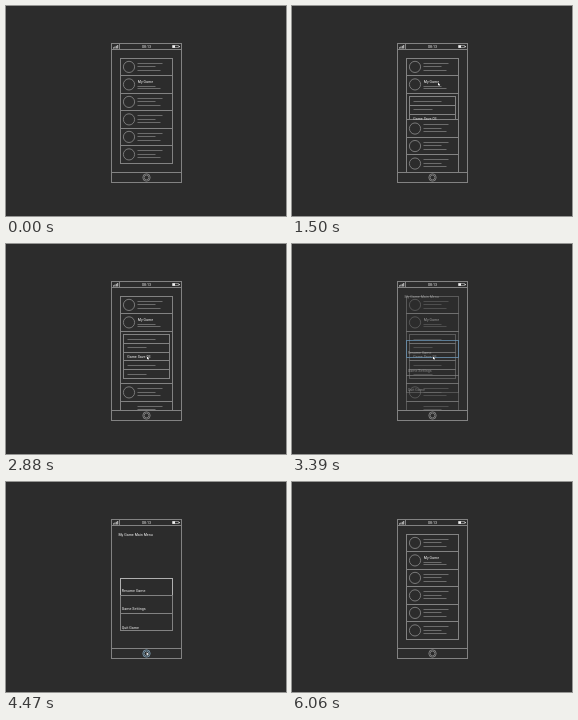
Write an HTML page with a canvas that moves like this. It is 280x210 px and loops after 6090 ms.

```html
<!DOCTYPE html>
<html lang="en">
<head>
<meta charset="utf-8">
<title>Phone menu wireframe</title>
<style>
  html, body { margin: 0; width: 100%; height: 100%; overflow: hidden; background: #2c2c2c; }
  canvas { display: block; width: 280px; height: 210px; }
</style>
</head>
<body>
<canvas></canvas>
<script>
const LOOP = 6090, W = 280, H = 210;
const BG = '#2c2c2c', LINE = '#828282', DIM = '#6c6c6c', WHITE = '#f2f2f2', BLUE = '#4a90c4';
const canvas = document.querySelector('canvas');
const ctx = canvas.getContext('2d');
const scale = window.devicePixelRatio || 1;
canvas.width = W * scale;
canvas.height = H * scale;

const clamp = v => Math.max(0, Math.min(1, v));
const progress = (t, from, to) => clamp((t - from) / (to - from));
const mix = (a, b, p) => a + (b - a) * p;
const smooth = p => p * p * (3 - 2 * p);
const snap = v => Math.floor(v) + .5;

// Cubic bezier (.25, .1, .25, 1): fast start, long settling.
function ease(p) {
  const bezier = (u, a, b) => 3 * u * (1 - u) ** 2 * a + 3 * u * u * (1 - u) * b + u ** 3;
  let low = 0, high = 1;
  for (let i = 0; i < 20; i++) {
    const mid = (low + high) / 2;
    if (bezier(mid, .25, .25) < p) low = mid; else high = mid;
  }
  return bezier(low, .1, 1);
}

const moves = [
  { start: 90, end: 760, to: [146, 76.7] },
  { start: 2250, end: 2880, to: [141, 112.5] },
  { start: 3810, end: 4440, to: [140.6, 170.3] },
  { start: 5610, end: 6240, to: [269, 46] }
];

function cursorAt(t) {
  let x = 178, y = -1;
  for (const { start, end, to } of moves) {
    const p = ease(progress(t, start, end));
    x = mix(x, to[0], p);
    y = mix(y, to[1], p);
  }
  return { x, y, visible: t >= 90 && t < 6060 };
}

function box(x, y, w, h, color = LINE) {
  ctx.strokeStyle = color;
  ctx.lineWidth = 1;
  ctx.strokeRect(snap(x), snap(y), snap(x + w) - snap(x), snap(y + h) - snap(y));
}

function line(x1, y1, x2, y2, color = LINE) {
  ctx.strokeStyle = color;
  ctx.lineWidth = 1;
  ctx.beginPath();
  ctx.moveTo(snap(x1), snap(y1));
  ctx.lineTo(snap(x2), snap(y2));
  ctx.stroke();
}

function circle(x, y, r, color = LINE) {
  ctx.strokeStyle = color;
  ctx.lineWidth = .9;
  ctx.beginPath();
  ctx.arc(x, y, r, 0, 7);
  ctx.stroke();
}

function text(label, x, y, align = 'left') {
  ctx.font = '3.65px Roboto, sans-serif';
  ctx.textAlign = align;
  ctx.fillStyle = WHITE;
  ctx.fillText(label, x, y);
}

const inside = (c, x, y, w, h) =>
  c.visible && c.x >= x && c.x < x + w && c.y >= y && c.y < y + h;

function drawPhone(c) {
  box(105.5, 37.5, 70, 139);
  line(105.5, 43.5, 175.5, 43.5);
  line(113.5, 37.5, 113.5, 43.5);
  line(105.5, 166.5, 175.5, 166.5);
  ctx.fillStyle = '#c8c8c8';
  for (let i = 0; i < 4; i++) ctx.fillRect(107 + i * 1.4, 41.4 - i * .8, 1, 1.1 + i * .8);
  text('08:13', 140.5, 42, 'center');
  box(166.5, 39.5, 6, 2);
  ctx.fillRect(166.5, 39.3, 2.5, 2.5);
  ctx.fillRect(173, 40, .8, 1.2);

  const onRing = c.visible && Math.hypot(c.x - 140.5, c.y - 171.5) < 4;
  const ringColor = onRing ? '#7896aa' : LINE;
  if (inside(c, 105.5, 37.5, 70, 6)) box(105.5, 37.5, 70, 6, BLUE);
  if (!onRing && inside(c, 105.5, 166.5, 70, 10)) box(105.5, 166.5, 70, 10, BLUE);
  circle(140.5, 171.5, 3.7, ringColor);
  circle(140.5, 171.5, 2.4, ringColor);
}

function drawRow(y, named) {
  box(114.5, y, 52, 17.5);
  if (y + 14.5 < 166) circle(123, y + 8.9, 5.6);
  if (named) {
    text('My Game', 131.7, y + 7.2);
    line(131.5, y + 10.6, 149.5, y + 10.6, DIM);
    line(131.5, y + 12.6, 154.5, y + 12.6, DIM);
  } else {
    line(131.5, y + 5, 156, y + 5, DIM);
    line(131.5, y + 8.6, 149, y + 8.6, DIM);
    line(131.5, y + 12.3, 154.5, y + 12.3, DIM);
  }
}

function drawSaves(open) {
  ctx.save();
  ctx.beginPath();
  ctx.rect(114, 87, 53, open);
  ctx.clip();
  for (let i = 0; i < 5; i++) {
    const y = 90.5 + i * 8.8;
    box(117.5, y, 46, 8.8);
    if (i === 2) text('Game Save 03', 121.2, y + 6);
    else line(121, y + 4.5, i % 3 ? 140.5 : 149, y + 4.5, DIM);
  }
  ctx.restore();
}

function drawList(t, c) {
  const open = t < 4000 ? 26 * progress(t, 720, 840) + 26.5 * smooth(progress(t, 1470, 1800)) : 0;
  ctx.save();
  ctx.beginPath();
  ctx.rect(112, 50, 56, 116);
  ctx.clip();
  for (let i = 0; i < 6; i++) drawRow(52 + i * 17.5 + (i > 1 ? open : 0), i === 1);
  if (open) {
    box(114.5, 87, 52, open);
    drawSaves(open);
  }
  if (inside(c, 114.5, 52, 52, 17.5)) box(114.5, 52, 52, 17.5, BLUE);
  // Text and the nested list take the hover away from their row.
  if (inside(c, 114.5, 69.5, 52, 3) || inside(c, 114.5, 83, 52, 4)) box(114.5, 69.5, 52, 17.5, BLUE);
  if (open && inside(c, 114.5, 87, 52, 3.5)) box(114.5, 87, 52, open, BLUE);
  for (let i = 0; open && i < 2; i++) {
    const y = 90.5 + i * 8.8;
    if (inside(c, 117.5, y, 46, 8.8)) box(117.5, y, 46, 8.8, BLUE);
  }
  ctx.restore();
}

function drawMenu(c) {
  text('My Game Main Menu', 112.4, 54.2);
  const buttons = [['Resume Game', 110.2], ['Game Settings', 128], ['Quit Game', 147]];
  const top = i => 96 + i * 17.5;
  buttons.forEach(([label, baseline], i) => {
    box(114.5, top(i), 52, 17.5, i ? LINE : '#b0b0b0');
    text(label, 115.8, baseline);
  });
  const hovered = buttons.findIndex((_, i) => inside(c, 114.5, top(i), 52, 17.5));
  if (hovered >= 0) box(114.5, top(hovered), 52, 17.5, BLUE);
}

function drawCursor({ x, y, visible }) {
  if (!visible) return;
  ctx.beginPath();
  [[0, 0], [0, 2.9], [.7, 2.3], [1.2, 3.2], [1.7, 3], [1.3, 2.1], [2.3, 2]]
    .forEach(([dx, dy]) => ctx.lineTo(x + dx, y + dy));
  ctx.closePath();
  ctx.strokeStyle = BG;
  ctx.lineWidth = .5;
  ctx.stroke();
  ctx.fillStyle = '#ffffff';
  ctx.fill();
}

function withAlpha(alpha, draw) {
  if (alpha <= 0) return;
  ctx.globalAlpha = alpha;
  draw();
  ctx.globalAlpha = 1;
}

function render(now) {
  const t = now % LOOP;
  const c = cursorAt(t);
  ctx.setTransform(scale, 0, 0, scale, 0, 0);
  ctx.fillStyle = BG;
  ctx.fillRect(0, 0, W, H);
  const menu = progress(t, 3210, 3600) - progress(t, 4950, 5220);
  withAlpha(1 - menu, () => drawList(t, c));
  withAlpha(menu, () => drawMenu(c));
  drawPhone(c);
  drawCursor(c);
}

function frame() {
  render(performance.now());
  requestAnimationFrame(frame);
}
frame();
</script>
</body>
</html>
```
